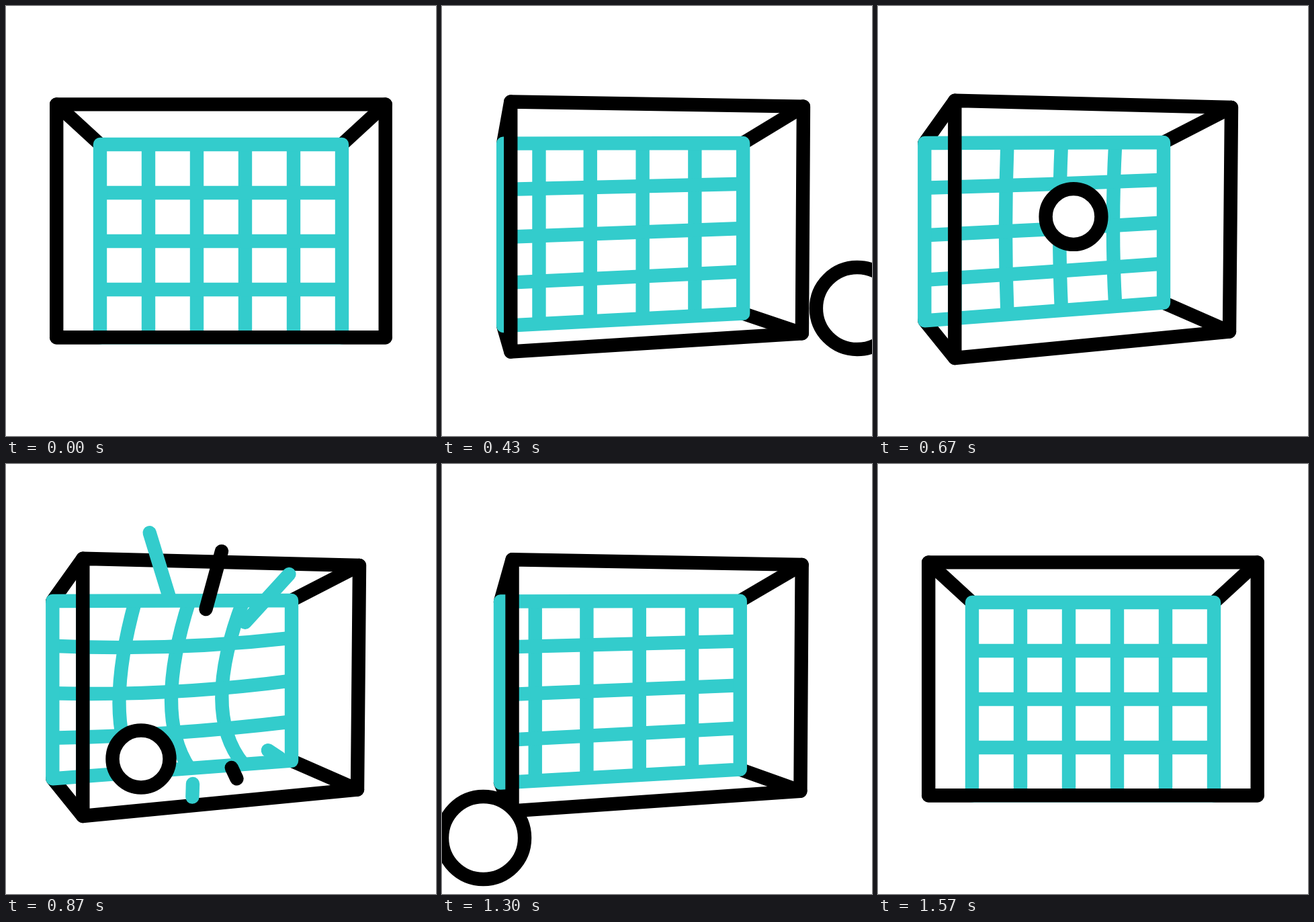
Recreate the animation shown at these times as an HTML page with a canvas. Size 640 by 640 pixels, loop 1.67 s.

```html
<!DOCTYPE html>
<html lang="en">
<head>
<meta charset="utf-8">
<title>Goal</title>
<style>
html, body { margin: 0; height: 100%; overflow: hidden; background: #fff; }
canvas { display: block; }
</style>
</head>
<body>
<canvas id="stage" width="640" height="640"></canvas>
<script>
const ctx = document.getElementById('stage').getContext('2d');
const LOOP = 1670, STEPS = 50;
const BLACK = '#000', CYAN = '#33cccc';

// Corners run clockwise from top left: facing pose, then turned pose.
const FRONT = [
  [[75.2, 146.4], [564.7, 146.4], [564.7, 493.3], [75.2, 493.3]],
  [[114.3, 140.8], [526, 151], [523, 484.5], [114.3, 524]]
];
const COLUMNS = [[140, 212, 284, 356, 428, 500], [69.3, 114.3, 192.5, 273, 353.3, 425]];
const ROWS_LEFT = [[206, 278, 350, 422, 493.3], [204, 270.8, 341.3, 407.7, 468.3]];
const ROWS_RIGHT = [[206, 278, 350, 422, 493.3], [203, 258.8, 322.5, 383.5, 441.7]];
const BULGE = [0, 0, -48, -54, -64, 0];

// colour, origin, far end
const RAYS = [
  [CYAN, [285, 335], [197, 48]],
  [BLACK, [265, 335], [334, 82]],
  [CYAN, [265, 335], [458, 124]]
];
const CHIPS = [
  [CYAN, [282.4, 338], [273.8, 608]],
  [BLACK, [281, 337], [388, 562]],
  [CYAN, [266, 345], [508.5, 503.8]]
];

const clamp = v => Math.min(1, Math.max(0, v));
const mix = (a, b, p) => Array.isArray(a) ? a.map((v, i) => mix(v, b[i], p)) : a + (b - a) * p;
const ease = p => (1 - Math.cos(Math.PI * clamp(p))) / 2;

function line(color, points, closed) {
  ctx.strokeStyle = color;
  ctx.beginPath();
  points.forEach(p => ctx.lineTo(...p));
  if (closed) ctx.closePath();
  ctx.stroke();
}

function curve(color, a, control, b) {
  ctx.strokeStyle = color;
  ctx.beginPath();
  ctx.moveTo(...a);
  ctx.quadraticCurveTo(...control, ...b);
  ctx.stroke();
}

function drawGoal(turn, bend) {
  const front = mix(...FRONT, turn);
  const xs = mix(...COLUMNS, turn);
  const left = mix(...ROWS_LEFT, turn);
  const right = mix(...ROWS_RIGHT, turn);
  const at = (row, x) => mix(left[row], right[row], (x - xs[0]) / (xs[5] - xs[0]));
  const net = [[xs[0], left[0]], [xs[5], right[0]], [xs[5], right[4]], [xs[0], left[4]]];

  net.forEach((corner, i) => line(BLACK, [front[i], corner]));
  ctx.lineCap = 'butt';
  for (let i = 1; i < 5; i++) {
    const top = at(0, xs[i]), bottom = at(4, xs[i]);
    curve(CYAN, [xs[i], top], [xs[i] + BULGE[i] * bend, mix(top, bottom, .5 + .18 * bend)], [xs[i], bottom]);
  }
  for (let r = 1; r < 4; r++) {
    const sag = (r === 3 ? 9 : 14) * bend;
    curve(CYAN, [xs[0], left[r]], [(xs[0] + xs[5]) / 2, (left[r] + right[r]) / 2 + sag], [xs[5], right[r]]);
  }
  ctx.lineCap = 'round';
  line(CYAN, net, true);
  line(BLACK, front, true);
}

function drawSparks(f) {
  if (f <= 20 || f >= 35) return;
  const spark = ([color, from, to], tail, head) => line(color, [mix(from, to, tail), mix(from, to, head)]);
  const head = clamp((f - 20) / 7.4), tail = clamp((f - 21.3) / 10);
  if (tail < 1) RAYS.forEach(s => spark(s, tail, head));
  const travel = 1 - (1 - (f - 20) / 15) ** 1.4;
  CHIPS.forEach(s => spark(s, travel, travel + .073));
}

// x, y, radius: shot, drop down the net, roll forward, leave
function ballAt(f) {
  const hit = [291, 313.5, 41.4], floor = [201, 439, 42.5], mouth = [113, 536, 60.5];
  if (f < 20) {
    const t = 20 - f;
    return [291 + 46.7 * t, 313.5 + 10.4 * t + 1.3 * t * t, 41.4 + 2.8 * t];
  }
  if (f < 26) return mix(hit, floor, (f - 20) / 6);
  if (f < 35) return mix(floor, mouth, (f - 26) / 9);
  return mix(mouth, [-93, 618, 64.7], ease((f - 35) / 12));
}

function drawBall(f) {
  ctx.beginPath();
  ctx.arc(...ballAt(f), 0, Math.PI * 2);
  ctx.fillStyle = '#fff';
  ctx.strokeStyle = BLACK;
  ctx.fill();
  ctx.stroke();
}

function render(now) {
  const f = Math.floor((now % LOOP + 7) / LOOP * STEPS);
  const turn = ease((f - 3) / 16) - ease((f - 35) / 12);
  const bend = Math.sin(Math.PI * clamp((f - 19) / 14)) ** 1.5;
  ctx.fillStyle = '#fff';
  ctx.fillRect(0, 0, 640, 640);
  ctx.lineWidth = 20.4;
  ctx.lineCap = ctx.lineJoin = 'round';
  drawGoal(turn, bend || 0);
  drawSparks(f);
  drawBall(f);
}

let start;
function tick(now) {
  start ??= now;
  render(now - start);
  requestAnimationFrame(tick);
}
render(0);
requestAnimationFrame(tick);
</script>
</body>
</html>
```
